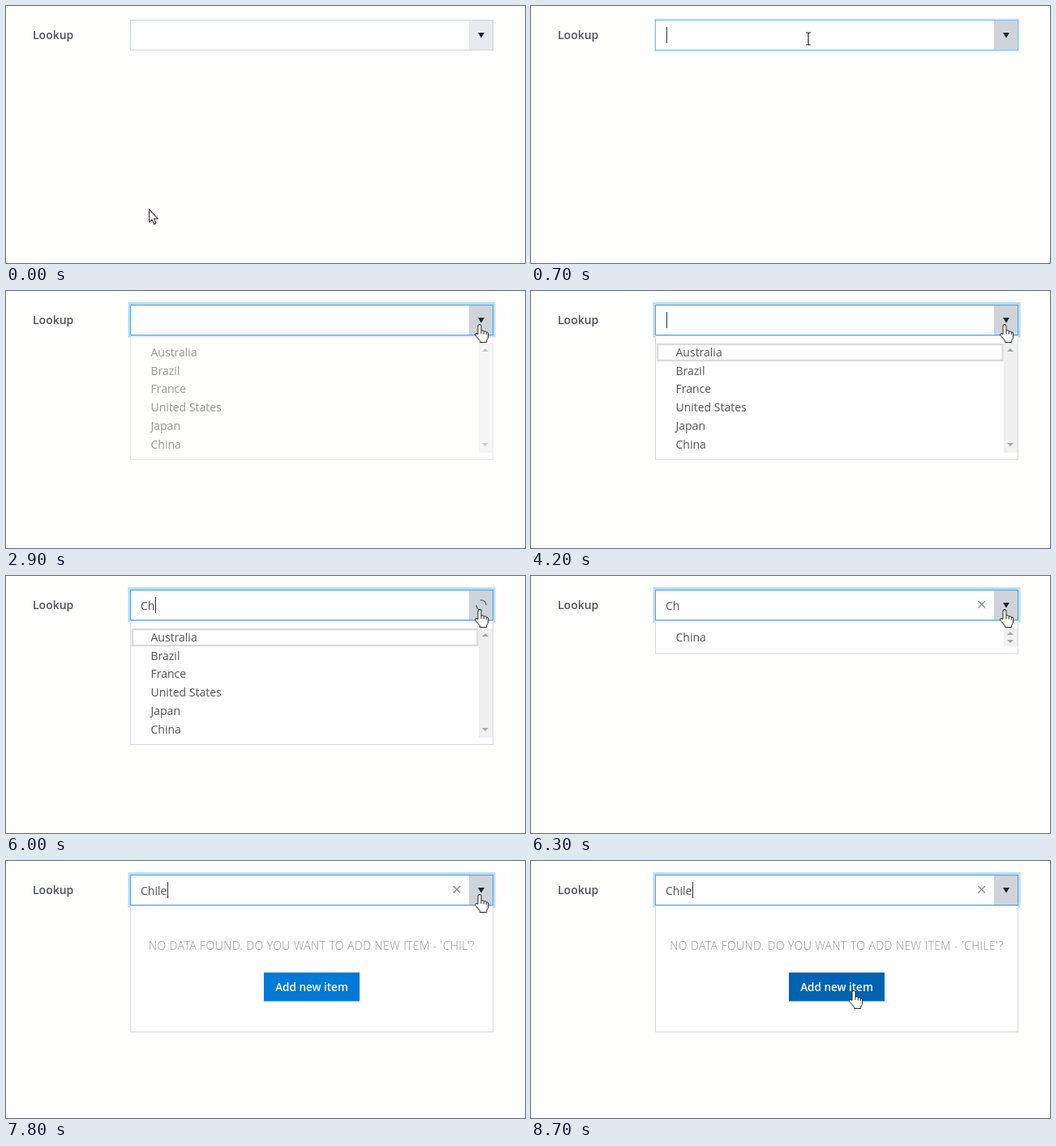
These frames come from a looping animation (640x318 px, 8900 ms). An HTML page:

```html
<!DOCTYPE html>
<html lang="en">
<head>
<meta charset="utf-8">
<title>Lookup field</title>
<style>
  html, body { margin: 0; height: 100%; overflow: hidden; background: #fefefd; }
  svg { display: block; width: 640px; height: 318px; font: 14px "Open Sans", "Noto Sans", sans-serif; fill: #555; }
  .label { font-weight: 600; fill: #505357; }
  .nodata { font-weight: 300; letter-spacing: .42px; fill: #8f9299; }
  .action { font-size: 13.5px; font-weight: 600; fill: #fff; }
</style>
</head>
<body>
<svg id="stage" viewBox="0 0 640 318"></svg>
<script>
const LOOP = 8900, STEP = 100;
const stage = document.getElementById('stage');
const ruler = document.createElement('canvas').getContext('2d');
const COUNTRIES = ['Australia', 'Brazil', 'France', 'United States', 'Japan', 'China'];

// Times are in milliseconds from the start of the loop.
const TYPING = [[5600, 'C'], [5800, 'h'], [6700, 'i'], [7400, 'l'], [7800, 'e']];
const CARET_TOGGLES = [700, 1100, 1500, 2000, 2400, 2900, 3300, 3700, 4200, 4600, 5100, 5500,
                       5600, 6300, 6700, 7200, 7400, 8400, 8700];
const LOADING = [[2600, 2900], [5900, 6200], [6900, 7000], [7500, 7600], [7900, 8000]];
const FOCUSED_ITEM = [[3000, 6200], [6400, 7000], [7100, 7600]];
const POINTER = [[0, 176, 251], [600, 342, 40], [1700, 342, 40], [2000, 578, 34], [2100, 578, 34],
                 [2400, 585, 33], [2500, 585, 33], [2600, 584, 41], [8300, 584, 41], [8700, 398, 160]];

const within = (t, spans) => spans.some(([from, to]) => t >= from && t < to);
const rect = (x, y, w, h, fill, stroke = 'none', sw = 1) =>
  `<rect x="${x}" y="${y}" width="${w}" height="${h}" fill="${fill}" stroke="${stroke}" stroke-width="${sw}"/>`;
const text = (x, y, content, attrs = '') => `<text x="${x}" y="${y}" ${attrs}>${content}</text>`;
const path = (d, fill, stroke = 'none', sw = 1) =>
  `<path d="${d}" fill="${fill}" stroke="${stroke}" stroke-width="${sw}" stroke-linejoin="round"/>`;

function pointerAt(t) {
  const next = POINTER.findIndex(key => key[0] > t);
  if (next < 0) return POINTER.at(-1).slice(1);
  const [t0, x0, y0] = POINTER[next - 1], [t1, x1, y1] = POINTER[next];
  const p = (t - t0) / (t1 - t0), eased = p * p * (3 - 2 * p);
  return [x0 + (x1 - x0) * eased, y0 + (y1 - y0) * eased];
}

function pointer(t) {
  const [x, y] = pointerAt(t);
  const inField = x > 153 && x < 601 && y > 17 && y < 55;
  const onAction = t > 8000 && x > 318 && x < 436 && y > 138 && y < 173;
  let shape;
  if (onAction || inField && x > 571) {
    shape = path('M-2 12V2Q-2 .5 0 .5Q2 .5 2 2V8Q5 7 5.3 9Q8 8 8.3 10Q10.7 9.5 10.7 12V15Q10.7 18 8.7 20V22.5H.5V20.5L-4.8 14.5Q-6 12.5-4.6 11.5Q-3.4 11-2 12.5Z', '#fff', '#222')
      + path('M2 8V12M5.3 9V12.5M8.3 10V13', 'none', '#222');
  } else if (inField) {
    shape = path('M-3-7H-1Q0-7 0-6Q0-7 1-7H3M0-6V7M-3 8H-1Q0 8 0 7Q0 8 1 8H3', 'none', '#222', 1.2);
  } else {
    shape = path('M.5.5V16.5L4 13.2L6.6 19L9 18L6.5 12.3H11.5Z', '#fff', '#3d2f38', 1.1);
  }
  return `<g transform="translate(${x} ${y})">${shape}</g>`;
}

function field(t) {
  const focused = t >= 700;
  const value = TYPING.filter(([at]) => t >= at).map(([, letter]) => letter).join('');
  let out = '';
  if (t >= 800) out += rect(150.5, 14, 453, 43.5, '#b9dcf5');
  else if (focused) out += rect(152, 15.5, 450, 41, '#d3eafa');
  out += rect(153.5, 17.5, 447, 37, '#fefefe');
  out += rect(571, 18, 29.5, 36.5, focused ? '#cfd4da' : '#e7ebee');
  out += rect(153.5, 17.5, 447, 37, 'none', t >= 800 ? '#4aa8e6' : focused ? '#7dbfee' : '#ccd5da');
  out += text(166, 42, value);
  if (CARET_TOGGLES.filter(at => t >= at).length % 2) {
    ruler.font = getComputedStyle(stage).font;
    out += rect(Math.round(166.5 + ruler.measureText(value).width), 26, 1, 20, '#333');
  }
  if (t >= 6200) out += path('M551.5 31L560 39.5M560 31L551.5 39.5', 'none', '#8b8f94', 1.4);
  out += within(t, LOADING)
    ? `<g transform="translate(586 36) rotate(${t * .9 % 360})">${path('M-1-6A6 6 0 0 1 6 0M1 6A6 6 0 0 1-6 0', 'none', '#5c6268', 1.3)}</g>`
    : path('M582 33H590L586 39.5Z', '#1c242c');
  return out;
}

function list(t, items) {
  const scrollHeight = items.length > 1 ? 135 : 22;
  const up = items.length > 1 ? 73 : 71, down = items.length > 1 ? 190 : 81;
  return rect(583, 65, 17, scrollHeight, '#f0f0f0')
    + path(`M587 ${up + 2}h8l-4-4zM587 ${down - 2}h8l-4 4z`, '#a3a3a3')
    + (within(t, FOCUSED_ITEM) ? rect(156, 66, 425.5, 20, 'none', '#dbdbdd', 2.4) : '')
    + items.map((name, i) => text(178.5, 81 + 22.7 * i, name)).join('');
}

function noData(t) {
  const name = t < 8000 ? 'CHIL' : 'CHILE';
  return text(377, 110, `NO DATA FOUND. DO YOU WANT TO ADD NEW ITEM - '${name}'?`, 'class="nodata" text-anchor="middle"')
    + rect(318, 138, 118, 35.5, t >= 8600 ? '#0063b1' : '#0078d6')
    + text(377, 161, 'Add new item', 'class="action" text-anchor="middle"');
}

function popup(t) {
  if (t < 2900) return '';
  const [bottom, content] = t < 6200 ? [208.5, list(t, COUNTRIES)]
    : t < 7600 ? [96, list(t, ['China'])]
    : [211.5, noData(t)];
  return `<g opacity="${t < 3000 ? .6 : 1}">`
    + rect(153.5, 55.5, 447, bottom - 55.5, '#fefefe', '#d7dade') + content + '</g>'
    + rect(153, 54, 448, 1, '#4aa8e6');
}

let shown = -1;
function frame(now) {
  const t = Math.floor(now % LOOP / STEP) * STEP;
  if (t !== shown) {
    shown = t;
    stage.innerHTML = text(33, 41, 'Lookup', 'class="label"') + field(t) + popup(t) + pointer(t);
  }
  requestAnimationFrame(frame);
}
frame(performance.now());
</script>
</body>
</html>
```
